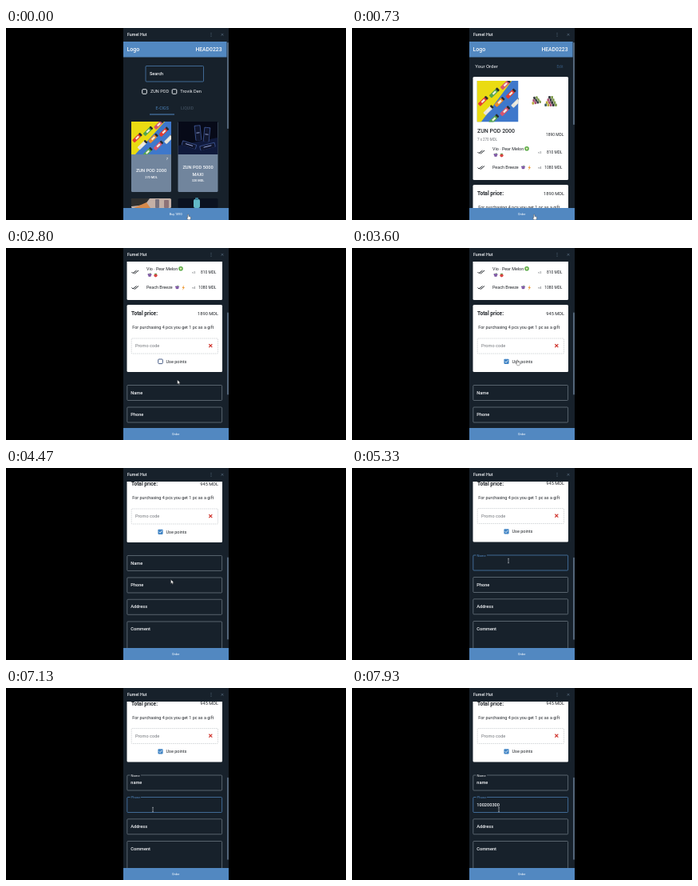
Write an HTML page with a canvas that moves like this. It is 426x240 px and loops after 8 s.

```html
<!DOCTYPE html>
<html lang="en">
<head>
<meta charset="utf-8">
<title>Shop checkout</title>
<style>
  html, body { margin: 0; width: 100%; height: 100%; overflow: hidden; background: #000; }
  canvas { display: block; width: 100vw; height: 100vh; }
</style>
</head>
<body>
<canvas id="stage"></canvas>
<script>
const canvas = document.getElementById('stage');
const ctx = canvas.getContext('2d');
const LOOP = 8000, STEP = 1000 / 15;
const BG = '#17212b', BLUE = '#5288c1', WHITE = '#f5f7fa', INK = '#22262b', GREY = '#74777c', BORDER = '#74808a';

// Times of the user's actions, in ms
const OPEN_ORDER = 300, USE_POINTS = 3200, FOCUS_NAME = 5130, FOCUS_PHONE = 6900;
const SCROLL = [[1250, 0], [1900, 90], [2250, 90], [2700, 125], [3850, 125], [4500, 187.5]];
const MOUSE_X = [[1000, 228], [1500, 225], [2500, 225], [3050, 207], [4400, 207], [5000, 196], [6500, 196], [6850, 184]];
const MOUSE_Y = [[1000, 235.5], [1500, 199], [2500, 199], [3050, 142.5], [4400, 142.5], [5000, 116], [6500, 116], [6850, 152]];

function track(keys, t) {
  if (t <= keys[0][0]) return keys[0][1];
  for (let i = 1; i < keys.length; i++) {
    const [t0, a] = keys[i - 1], [t1, b] = keys[i];
    if (t < t1) {
      const p = (t - t0) / (t1 - t0);
      return a + (b - a) * p * p * (3 - 2 * p);
    }
  }
  return keys[keys.length - 1][1];
}

const typed = (word, t, start, end) =>
  word.slice(0, Math.max(0, Math.floor((t - start) / (end - start) * word.length)));

function rect(x, y, w, h, color, radius = 0) {
  ctx.fillStyle = color;
  ctx.beginPath();
  ctx.roundRect(x, y, w, h, radius);
  ctx.fill();
}

function outline(x, y, w, h, color, width = 0.7, dash = []) {
  ctx.strokeStyle = color;
  ctx.lineWidth = width;
  ctx.setLineDash(dash);
  ctx.beginPath();
  ctx.roundRect(x, y, w, h, 1);
  ctx.stroke();
  ctx.setLineDash([]);
}

function line(points, color, width) {
  ctx.strokeStyle = color;
  ctx.lineWidth = width;
  ctx.beginPath();
  points.forEach(([x, y]) => ctx.lineTo(x, y));
  ctx.stroke();
}

function polygon(points, color) {
  ctx.fillStyle = color;
  ctx.beginPath();
  points.forEach(([x, y]) => ctx.lineTo(x, y));
  ctx.fill();
}

function dot(x, y, r, color) {
  ctx.fillStyle = color;
  ctx.beginPath();
  ctx.arc(x, y, r, 0, 7);
  ctx.fill();
}

function text(str, x, y, size, color, align = 'left', weight = 400) {
  ctx.font = `${weight} ${size}px Roboto, sans-serif`;
  ctx.textAlign = align;
  ctx.fillStyle = color;
  ctx.fillText(str, x, y);
}

function cross(x, y, r, color, width) {
  line([[x - r, y - r], [x + r, y + r]], color, width);
  line([[x + r, y - r], [x - r, y + r]], color, width);
}

function checkbox(x, y, color, checked) {
  if (!checked) return outline(x - 2.8, y - 2.8, 5.6, 5.6, color, 1);
  rect(x - 3.1, y - 3.1, 6.2, 6.2, '#4285c5', 0.8);
  line([[x - 1.8, y], [x - 0.5, y + 1.4], [x + 2, y - 1.5]], '#fff', 0.8);
}

function clipped(x, y, w, h, draw) {
  ctx.save();
  ctx.beginPath();
  ctx.rect(x, y, w, h);
  ctx.clip();
  draw();
  ctx.restore();
}

function rotated(x, y, angle, draw) {
  ctx.save();
  ctx.translate(x, y);
  ctx.rotate(angle);
  draw();
  ctx.restore();
}

// Staggered pens on a yellow and blue diagonal split
function pensPhoto(x, y, w, h) {
  const tints = ['#e43d32', '#e8e4da', '#55a64a', '#f08a28', '#d8556f'];
  clipped(x, y, w, h, () => {
    rect(x, y, w, h, '#3f78cb');
    polygon([[x, y], [x + w * 0.84, y], [x + w * 0.1, y + h], [x, y + h]], '#eadb12');
    for (let i = 0; i < 9; i++) {
      const row = Math.floor(i / 3), col = i % 3;
      const px = x + w * (0.14 + col * 0.27 + row * 0.13);
      const py = y + h * (0.5 - col * 0.2 + row * 0.22);
      rotated(px, py, -0.78, () => {
        const len = w * 0.25, thick = w * 0.09;
        rect(-len / 2, -thick / 2, len, thick, tints[(i * 2) % 5], 1);
        rect(-len * 0.15, -thick / 4, len * 0.4, thick / 2, '#f1eee2', 0.5);
        rect(len * 0.4, -thick / 2, len * 0.2, thick, '#282c32', 0.8);
      });
    }
  });
}

function boxesPhoto(x, y) {
  clipped(x, y, 50, 41, () => {
    rect(x, y, 50, 41, '#070a18');
    polygon([[x, y + 30], [x + 50, y + 20], [x + 50, y + 41], [x, y + 41]], '#101a3c');
    for (const [dx, dy, w, h, angle] of [[25, 14, 8, 19, -0.1], [36, 16, 8, 18, 0.1], [14, 29, 19, 6, 0.3], [37, 31, 20, 6, -0.25]]) {
      rotated(x + dx, y + dy, angle, () => {
        rect(-w / 2, -h / 2, w, h, '#354a82', 1);
        rect(-w / 2 + 1, -h / 2 + 1, w - 2, h - 1, '#11172f', 1);
        line([[-w / 4, 0], [w / 4, 0]], '#9aa8dc', 0.9);
      });
    }
  });
}

function productCard(x, lines, price, firstBaseline) {
  rect(x, 117, 50, 88, '#71859d', 1.5);
  lines.forEach((str, i) => text(str, x + 25, firstBaseline + i * 9.3, 5.7, WHITE, 'center', 500));
  text(price, x + 25, firstBaseline + lines.length * 9.3 - 2, 3.9, WHITE, 'center', 500);
}

function header() {
  rect(147, 17, 132, 19.5, BLUE);
  text('Logo', 151.5, 29.3, 7, WHITE, 'left', 500);
  text('HEAD0223', 270.5, 29.3, 6.8, WHITE, 'right', 500);
}

function storePage() {
  header();
  outline(175, 47.5, 72.5, 19.5, BLUE);
  text('Search', 180, 59, 5.5, WHITE, 'left', 500);
  checkbox(173.5, 79.5, '#e4e8ec', false);
  text('ZUN POD', 181, 81.4, 5.5, WHITE);
  checkbox(211, 79.5, '#e4e8ec', false);
  text('Trovik Den', 218.3, 81.4, 5.7, WHITE);
  text('E-CIGS', 195.7, 102.2, 5.2, '#416f9d', 'center', 500);
  text('LIQUID', 227, 102.2, 5.2, '#3d4c5b', 'center', 500);
  rect(180, 107.6, 31, 0.8, BLUE);

  productCard(157, ['ZUN POD 2000'], '270 MDL', 180.4);
  pensPhoto(157, 117, 50, 41);
  text('7', 202, 164.5, 4, WHITE, 'center', 500);
  productCard(215.5, ['ZUN POD 5000', 'MAXI'], '320 MDL', 175.5);
  boxesPhoto(215.5, 117);

  rect(157, 213, 50, 12, '#c4b0a6', 1.5);
  polygon([[157, 213], [180, 213], [174, 221], [157, 223]], '#30302f');
  polygon([[160, 225], [176, 218], [181, 225]], '#d58a4c');
  rect(187, 214, 5, 11, '#77717c', 1);
  rect(198, 215, 6, 10, '#8d7378', 1);
  rect(215.5, 213, 50, 12, '#0b1220', 1.5);
  rect(235, 214, 8, 11, '#62b9c8', 2);
  rect(237, 212, 4, 3, '#3b7e96', 1);
}

function orderRow(y, flavour, count, price) {
  line([[157.5, y], [159, y + 1.6], [163.5, y - 2]], INK, 1);
  line([[160.5, y + 1.3], [161.3, y + 2], [166, y - 2]], INK, 1);
  text(flavour, 176, y - (count === 3 ? 2.2 : -1.8), 5.4, INK);
  text('×' + count, 237.5, y + 1.6, 4.4, GREY, 'right');
  text(price, 263.5, y + 1.7, 4.9, INK, 'right');
}

function grapes(x, y) {
  for (let i = 0; i < 6; i++) dot(x + (i % 3 - 1) * 1.5 * (i < 3 ? 1 : 0.6), y - 1 + Math.floor(i / 3) * 1.8, 1, '#7950a0');
  line([[x, y - 1.5], [x + 1, y - 3]], '#4d9b45', 0.8);
}

function packPile(x, y, rows, size) {
  const tints = ['#33363b', '#b8ab3a', '#7f9c4c', '#a85072', '#3b5f63'];
  for (let row = 0; row < rows; row++)
    for (let col = 0; col <= row + 1; col++)
      rect(x + (col - row / 2 - 1) * size, y + row * size, size * 0.85, size * 1.1, tints[(row * 3 + col * 2) % 5], 0.8);
}

function orderCard() {
  rect(151.5, 61, 119.5, 129, '#fff', 1.5);
  pensPhoto(156.5, 66, 52, 51.5);
  rotated(231, 91, -0.2, () => packPile(0, -5.5, 3, 3));
  packPile(249.3, 85, 4, 3.2);
  text('ZUN POD 2000', 157, 131.4, 7, INK, 'left', 500);
  text('7 x 270 MDL', 157, 140.8, 4.5, GREY);
  text('1890 MDL', 265.5, 134.8, 4.95, INK, 'right');

  orderRow(155, 'Vio · Pear Melon', 3, '810 MDL');
  dot(219, 150.8, 2.8, '#5cab49');
  dot(219, 150.8, 1.3, '#dce8ac');
  grapes(180, 159);
  dot(187.5, 159.3, 2.1, '#d84643');
  line([[186, 157.3], [189, 157.3]], '#55963d', 0.9);
  orderRow(174.5, 'Peach Breeze', 4, '1080 MDL');
  grapes(214.5, 174.5);
  polygon([[223, 171.5], [220.5, 175], [222, 175], [221, 178], [224, 174], [222.5, 174]], '#ee9a36');
}

function totalCard(t) {
  const points = t >= USE_POINTS;
  rect(151.5, 196, 119.5, 84, '#fff', 1.5);
  text('Total price:', 157, 209.4, 6.6, INK, 'left', 600);
  text(points ? '945 MDL' : '1890 MDL', 266, 208.9, 5.7, INK, 'right');
  text('For purchasing 4 pcs you get 1 pc as a gift', 158.3, 226.2, 5.45, INK);
  outline(157.2, 238, 108.3, 19, '#b7bcc2', 0.6, [1.5, 1]);
  text('Promo code', 162, 249, 5.6, GREY);
  cross(256.3, 247.2, 2, '#cf3028', 1.2);
  checkbox(193.5, 266.8, '#4a5f88', points);
  text('Use points', 200.5, 268.7, 5.5, INK);
}

function field(label, y, height, value = '', focused = false) {
  outline(151.8, y, 118.8, height, focused ? BLUE : BORDER);
  if (value || focused) {
    rect(155.5, y - 1, 13.5, 2, BG);
    text(label, 156.5, y + 1.6, 4.2, focused ? BLUE : WHITE);
    text(value, 156.3, y + 11, 5.6, WHITE, 'left', 500);
  } else {
    text(label, 156.3, y + 11.1, 5.6, WHITE, 'left', 500);
  }
}

function orderPage(t) {
  header();
  text('Your Order', 154.3, 50.3, 6, WHITE);
  text('Edit', 264.5, 50, 4.8, '#36597d', 'right');
  orderCard();
  totalCard(t);
  field('Name', 296.5, 19, typed('name', t, 5650, 6250), t >= FOCUS_NAME && t < FOCUS_PHONE);
  field('Phone', 324, 19, typed('100200300', t, 7050, 7800), t >= FOCUS_PHONE);
  field('Address', 351.3, 19);
  field('Comment', 379, 48);
}

function pointer(t) {
  const x = track(MOUSE_X, t), y = track(MOUSE_Y, t);
  const shape = points => {
    const placed = points.map(([a, b]) => [x + a, y + b]);
    ctx.lineJoin = 'round';
    polygon(placed, '#fff');
    line([...placed, placed[0]], '#333', 0.4);
  };
  if (t > 4950) {
    line([[x, y - 2.7], [x, y + 2.7]], '#c9ced5', 0.6);
    for (const end of [-2.7, 2.7]) line([[x - 1, y + end], [x + 1, y + end]], '#c9ced5', 0.5);
  } else if (t < 1200 || (t > 2950 && t < 3850)) {
    shape([[-0.4, -2.4], [0.8, -2.4], [0.9, 0], [3.4, 0.6], [3.4, 3], [2.6, 4.3], [0, 4.3], [-1.8, 1.7], [-0.3, 1.8]]);
  } else {
    shape([[0, -2], [0, 3], [1.2, 2], [2, 3.7], [2.8, 3.3], [2, 1.7], [3.6, 1.6]]);
  }
}

function draw(t) {
  const ordering = t >= OPEN_ORDER, scroll = track(SCROLL, t);
  rect(0, 0, 426, 240, '#000');
  clipped(147, 0, 132, 240, () => {
    rect(147, 0, 132, 240, BG);
    clipped(147, 17, 129.6, 208, () => {
      ctx.translate(0, -scroll);
      if (ordering) orderPage(t); else storePage();
    });
    text('Fumel Hut', 152, 10.2, 5.3, WHITE, 'left', 500);
    for (const y of [6.4, 8.3, 10.2]) dot(257, y, 0.5, '#62778d');
    cross(271, 8.3, 1.4, '#62778d', 0.6);
    rect(277, 18 + scroll / 2, 2, ordering ? 103 : 108, '#53667a', 0.8);
    rect(147, 225, 132, 15, BLUE);
    text(ordering ? 'Order' : 'Buy 1890', 212.7, 234, 3.8, '#e4edf6', 'center', 500);
    pointer(t);
  });
}

function frame(now) {
  const scale = devicePixelRatio || 1;
  const w = Math.round(innerWidth * scale), h = Math.round(innerHeight * scale);
  if (canvas.width !== w || canvas.height !== h) {
    canvas.width = w;
    canvas.height = h;
  }
  ctx.setTransform(w / 426, 0, 0, h / 240, 0, 0);
  const t = now % LOOP;
  draw(Math.floor(t / STEP + 0.001) * STEP);
  requestAnimationFrame(frame);
}
requestAnimationFrame(frame);
</script>
</body>
</html>
```
